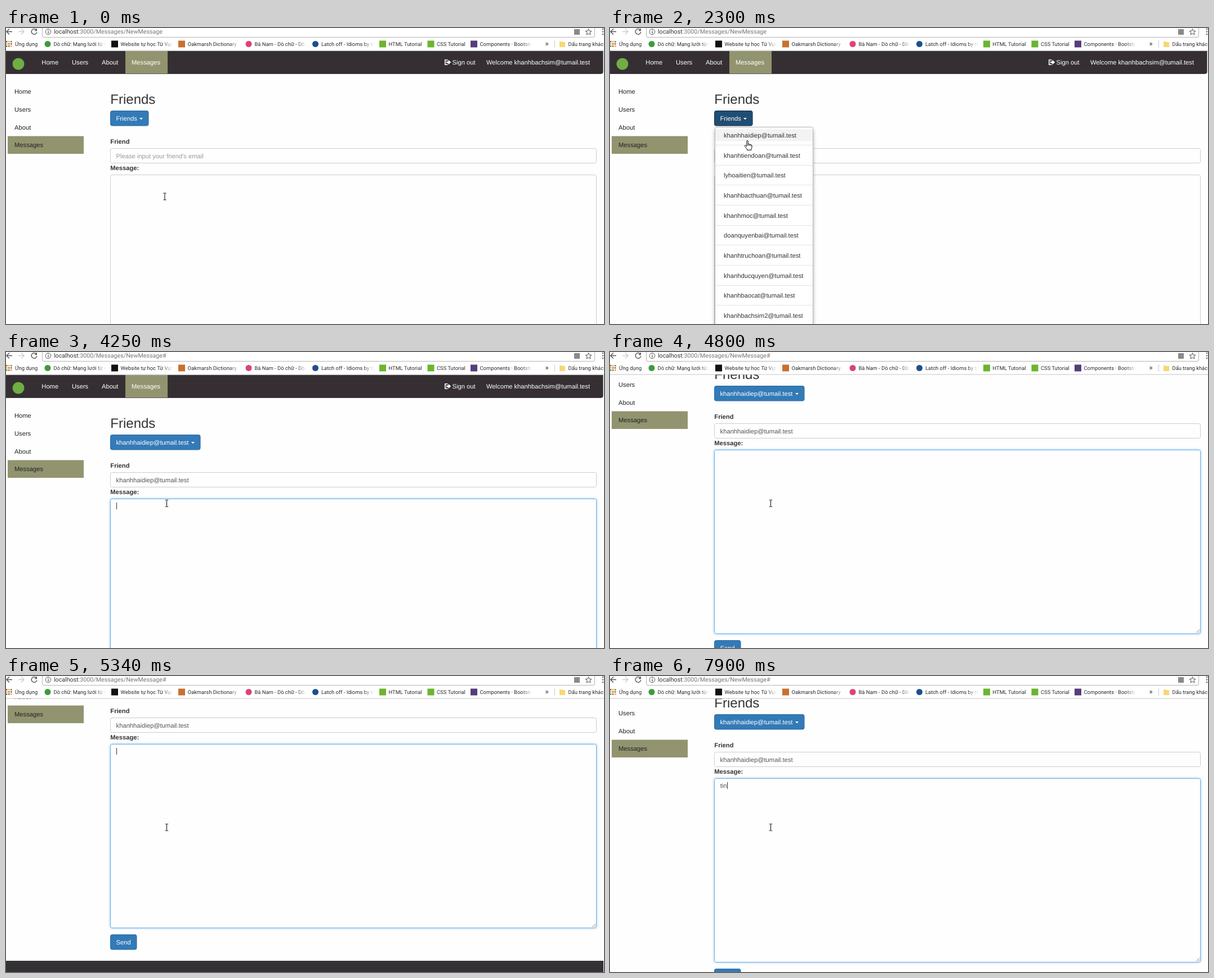
Recreate the animation shown at these times as an HTML page. Size 1062x527 px, loop 8 s.

```html
<!DOCTYPE html>
<html lang="vi">
<head>
<meta charset="utf-8">
<title>New message</title>
<style>
html, body { margin: 0; width: 100%; height: 100%; overflow: hidden; background: #fefefe; }
svg { display: block; }
text { font: 11.2px "Liberation Sans", Arial, sans-serif; fill: #222; text-rendering: geometricPrecision; white-space: pre; }
.nav text, .btn text { fill: #fff; }
.btn rect { fill: #337ab7; stroke: #2e6da4; }
.btn.hover rect { fill: #286090; stroke: #204d74; }
.btn.open rect { fill: #204d74; stroke: #122b40; }
.label { font-weight: bold; fill: #333; }
.field { fill: #fefefe; stroke: #ccc; }
.focus { stroke: #66afe9; filter: drop-shadow(0 0 2px rgba(102,175,233,.7)); }
.value { fill: #555; }
.hint { fill: #999; }
#menu > rect:first-child { fill: #fff; stroke: #b5b5b5; filter: drop-shadow(0 4px 3px rgba(0,0,0,.3)); }
.row { fill: none; }
.row.hover { fill: #f3f3f3; }
#menu text { fill: #333; }
.bar text { font: 9.4px Roboto, "Noto Sans", sans-serif; fill: #2a2a2a; }
.bar .url { font-size: 10.7px; fill: #777; }
.url tspan { fill: #333; }
.line { fill: none; stroke: #555; stroke-width: 1.4; }
#cursor path { display: none; fill: #fff; stroke: #000; stroke-linejoin: round; }
#cursor .on { display: inline; }
#cursor .beam { fill: none; }
</style>
</head>
<body>
<svg width="1062" height="527" viewBox="0 0 1062 527">
  <defs>
    <linearGradient id="fade"><stop stop-color="#fff" stop-opacity="0"/><stop offset="1" stop-color="#fff"/></linearGradient>
  </defs>
  <rect width="1062" height="527" fill="#fefefe"/>

  <g id="page">
    <g class="nav">
      <path d="M0 41H1060.500V78q0 3.500-3.500 3.500H0z" fill="#352f33"/>
      <path d="M0 81H1057" stroke="#1d191c"/>
      <rect x="212" y="41" width="75" height="40" fill="#92946f"/>
      <circle cx="22" cy="64" r="10.500" fill="#6fae45"/>
      <text x="63.300" y="65">Home</text>
      <text x="117" y="65">Users</text>
      <text x="170" y="65">About</text>
      <text x="223" y="65">Messages</text>
      <path d="M784.500 56.800H779.800V65.200H784.500" fill="none" stroke="#fff" stroke-width="1.600"/>
      <path d="M782 59.500H785.500V56.800L790.300 61L785.500 65.200V62.500H782z" fill="#fff"/>
      <text x="792.500" y="65">Sign out</text>
      <text x="853" y="65">Welcome khanhbachsim@tumail.test</text>
    </g>
    <rect x="3" y="192.500" width="135" height="31.500" fill="#92946f"/>
    <text x="15" y="117">Home</text>
    <text x="15" y="149">Users</text>
    <text x="15" y="180.500">About</text>
    <text x="15" y="212.300">Messages</text>

    <text x="185.300" y="135" style="font-size:24px;fill:#333">Friends</text>
    <g class="btn" id="toggle">
      <rect x="185.500" y="147.500" height="26.500" rx="3"/>
      <text x="195.500" y="165">Friends</text>
      <path d="M-3 160H3L0 163.200z" fill="#fff"/>
    </g>
    <text class="label" x="185.300" y="206">Friend</text>
    <rect class="field" x="185.500" y="214.500" width="863" height="26" rx="3"/>
    <text id="friend" x="195.600" y="231.500"></text>
    <text class="label" x="185.300" y="253">Message:</text>
    <rect class="field" id="area" x="185.500" y="261.500" width="863" height="327" rx="3"/>
    <path d="M1041 587L1047 581M1044.500 587L1047 584.500" stroke="#888"/>
    <text class="value" id="typed" x="195.700" y="278.300"></text>
    <rect id="caret" y="268" width="1" height="12" fill="#333"/>
    <g class="btn">
      <rect x="185.500" y="600.500" width="46.500" height="26.500" rx="3"/>
      <text x="195.500" y="618">Send</text>
    </g>
    <rect y="647" width="1061" height="60" fill="#333133"/>
    <g id="menu"><rect x="186.500" y="176.500" width="174" height="380" rx="3"/></g>
  </g>

  <g class="bar" id="bar">
    <rect width="1062" height="40" fill="#fff"/>
    <path d="M0 40H1062" stroke="#c4c4c4"/>
    <path class="line" d="M11 6.500H1M6 1.500L1 6.500L6 11.500"/>
    <path class="line" d="M22 6.500H32M27 1.500L32 6.500L27 11.500" style="stroke:#ccc"/>
    <path class="line" d="M53.800 3.500A4.800 4.800 0 1 0 54.800 7"/>
    <path d="M55 .5V5.200H50.300z" fill="#555"/>
    <path d="M64.500 0V14q0 2.500 2.500 2.500H1043q2.500 0 2.500-2.500V0" fill="none" stroke="#b4b4b4"/>
    <circle class="line" cx="75" cy="6.700" r="4.800" style="stroke-width:1"/>
    <path class="line" d="M75 6V9.500M75 3.700V5"/>
    <text class="url" x="85" y="10.300"><tspan>localhost</tspan>:3000/Messages/NewMessage<tspan id="hash" style="fill:inherit"></tspan></text>
    <rect x="1009" y="2" width="10" height="10" fill="#8a8a8a"/>
    <path class="line" style="stroke-width:1" d="M1034.500 1.500L1036 5.200L1040 5.500L1037 8L1038 12L1034.500 9.800L1031 12L1032 8L1029 5.500L1033 5.200z"/>
    <path d="M1059 1h2v2h-2zM1059 5.500h2v2h-2zM1059 10h2v2h-2z" fill="#555"/>
    <text x="16" y="32">Ứng dụng</text>
    <text x="957.500" y="32" style="font-size:13px">»</text>
    <path d="M974.500 22V35" stroke="#ccc"/>
    <path d="M983 24H987L988 25H993V34H983z" fill="#f7d774"/>
    <text x="998.500" y="32">Dấu trang khác</text>
  </g>

  <g id="cursor">
    <path class="beam" d="M-2.500-6H-.8L0-5.500L.8-6H2.500M0-5.500V5.500M-2.500 6H-.8L0 5.500L.8 6H2.500"/>
    <path class="arrow" d="M.5.5V13L3.400 10.400L5.400 15L7.400 14.200L5.400 9.700H9.300z"/>
    <path class="hand" d="M-1.200 10V1.500a1.200 1.200 0 0 1 2.400 0V6.500q2-.5 2.400.6q2-.3 2.400.9q2-.1 2 1.500V12.500L6.800 15.500V17.300H-.6V15.500L-4.600 10.500q-.6-1.700.9-1.700q1 0 2.500 2zM1.200 6.500V9.500M3.600 7.200V9.700M6 8V10"/>
  </g>
</svg>
<script>
const LOOP = 8000;
const $ = id => document.getElementById(id);

function add(parent, tag, attrs, text = '') {
  const el = document.createElementNS('http://www.w3.org/2000/svg', tag);
  for (const k in attrs) el.setAttribute(k, attrs[k]);
  el.textContent = text;
  return parent.appendChild(el);
}

// Bookmarks: icon x, colour, shape, title
const bookmarks = [
  [74, '#3f9b3a', 'circle', 'Dò chữ: Mạng lưới từ điển'],
  [193, '#111', 'rect', 'Website tự học Từ Vựng'],
  [312, '#c9702f', 'rect', 'Oakmarsh Dictionary'],
  [431, '#e0407b', 'circle', 'Bà Nam - Dò chữ - Dò chữ'],
  [549.5, '#1d4f8f', 'circle', 'Latch off - Idioms by topic'],
  [669, '#6cb52d', 'rect', 'HTML Tutorial'],
  [754.5, '#6cb52d', 'rect', 'CSS Tutorial'],
  [831, '#563d7c', 'rect', 'Components · Bootstrap']
];
for (const [x, fill, shape, title] of bookmarks) {
  add($('bar'), shape, shape === 'rect'
    ? { x: x - 6, y: 22.5, width: 12, height: 12, fill }
    : { cx: x, cy: 28.5, r: 5.5, fill });
  const clip = add($('bar'), 'svg', { x: x + 10.5, y: 20, width: 92.5, height: 18 });
  add(clip, 'text', { x: 0, y: 12 }, title);
  add(clip, 'rect', { x: 74, width: 19, height: 18, fill: 'url(#fade)' });
}
const dots = ['#e8453c', '#f2a33a', '#3aa757'];
for (let i = 0; i < 9; i++) {
  const col = i % 3, row = i / 3 | 0;
  add($('bar'), 'rect', { x: col * 4, y: 23 + row * 4, width: 2.6, height: 2.6, fill: dots[(col + row) % 3] });
}

// Dropdown
const people = ['khanhhaidiep', 'khanhtiendoan', 'lyhoaitien', 'khanhbacthuan', 'khanhmoc',
  'doanquyenbai', 'khanhtruchoan', 'khanhducquyen', 'khanhbaocat', 'khanhbachsim2'];
const mail = name => name + '@tumail.test';
const rowY = i => 191 + i * 35.67;
const rows = people.map((name, i) => {
  const y = rowY(i);
  const row = add($('menu'), 'rect', { class: 'row', x: 187, y: y - 10.5, width: 173, height: 21 });
  add($('menu'), 'rect', { x: 187, y: Math.round(y + 17), width: 173, height: 1, fill: '#e5e5e5' });
  add($('menu'), 'text', { x: 202, y: y + 4 }, mail(name));
  return row;
});

// Each track holds its value until the next time
const pointer = [
  [0, 'beam', 282, 300], [130, 'beam', 282, 281.5], [280, 'beam', 294, 236.5],
  [430, 'arrow', 269, 209], [560, 'arrow', 250, 187],
  [710, 'hand', 245, 172], [840, 'hand', 240, 169], [970, 'hand', 236, 173],
  [1510, 'hand', 238, 225], [1640, 'hand', 240, 263], [1920, 'hand', 239, 246],
  [2040, 'hand', 241, 226], [2180, 'hand', 243, 209], [2300, 'hand', 244, 200],
  [2450, 'hand', 247, 194], [2590, 'hand', 246, 192], [2740, 'arrow', 246, 192],
  [3160, 'beam', 257, 218.5], [3300, 'beam', 261, 223], [3430, 'beam', 266, 228],
  [3560, 'beam', 273, 235], [3690, 'arrow', 277, 246],
  [3840, 'beam', 283, 264], [3970, 'beam', 284.5, 268], [4100, 'beam', 285.5, 269.5]
];
const scroll = [[0, 0], [4680, 30], [4800, 87], [4930, 124], [5220, 136], [5340, 140], [5480, 79]];
const typing = [[0, ''], [6570, 'm'], [7230, ''], [7630, 't'], [7770, 'ti'], [7900, 'tin']];
const caret = [[0, 0], [4250, 1], [4800, 0], [5340, 1], [5760, 0], [6300, 1]];
const at = (track, t) => track.findLast(step => step[0] <= t).slice(1);
const show = (el, on) => el.setAttribute('visibility', on ? 'visible' : 'hidden');

function draw(t) {
  const [kind, x, y] = at(pointer, t);
  const open = t >= 1110 && t < 2740, chosen = t >= 2740;
  const friend = mail(people[0]);

  $('cursor').setAttribute('transform', `translate(${x} ${y})`);
  for (const p of $('cursor').children) p.classList.toggle('on', p.classList.contains(kind));
  $('page').setAttribute('transform', `translate(0 ${-at(scroll, t)[0]})`);

  const [box, label, arrow] = $('toggle').children;
  $('toggle').setAttribute('class', 'btn' + (open ? ' open' : t >= 710 && !chosen ? ' hover' : ''));
  box.setAttribute('width', chosen ? 159.5 : 67.5);
  label.textContent = chosen ? friend : 'Friends';
  arrow.setAttribute('transform', `translate(${chosen ? 332 : 240} 0)`);

  show($('menu'), open);
  rows.forEach((row, i) => row.classList.toggle('hover', Math.abs(y - rowY(i)) < 10.6));
  $('hash').textContent = chosen ? '#' : '';
  $('friend').textContent = chosen ? friend : "Please input your friend's email";
  $('friend').setAttribute('class', chosen ? 'value' : 'hint');

  $('area').classList.toggle('focus', t >= 4250);
  const [text] = at(typing, t);
  $('typed').textContent = text;
  $('caret').setAttribute('x', Math.round(195.7 + (text && $('typed').getComputedTextLength())));
  show($('caret'), at(caret, t)[0]);
}

const start = performance.now();
function tick() {
  draw((performance.now() - start) % LOOP);
  requestAnimationFrame(tick);
}
tick();
</script>
</body>
</html>
```
